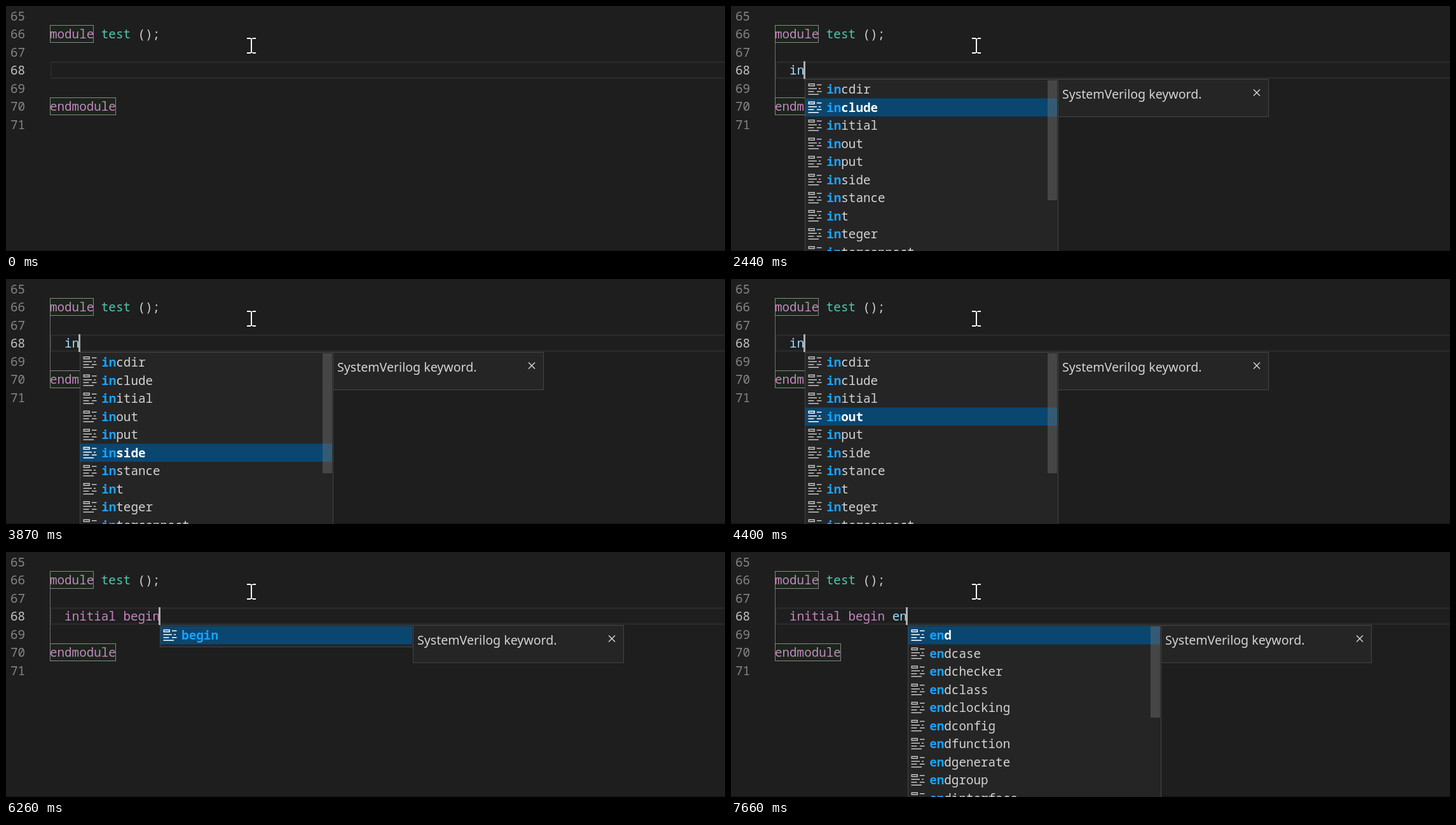
An HTML page with a canvas for the animation above (8 s loop, 1131 by 386 pixels).

```html
<!DOCTYPE html>
<html lang="en">
<head>
<meta charset="utf-8">
<title>Editor completion</title>
<style>
  html, body { margin: 0; width: 100%; height: 100%; overflow: hidden; background: #1e1e1e; }
  canvas { display: block; }
</style>
</head>
<body>
<canvas id="stage" width="1131" height="386"></canvas>
<script>
const ctx = document.getElementById('stage').getContext('2d');
const LOOP = 8000, ROW = 28.5, CHAR = 11.545;
const MONO = '19.24px "Noto Sans Mono", monospace';
const SANS = '19.6px "Noto Sans", sans-serif';
const PURPLE = '#c586c0', BLUE = '#9cdcfe', LIGHT = '#d4d4d4';

// Each track lists [start, value...]; the latest entry that has started applies.
const typed = [
  [0, ''], [1310, 'i'], [1510, 'in'], [5060, 'initial'], [5590, 'initial '],
  [5790, 'initial b'], [5860, 'initial be'], [6130, 'initial begi'],
  [6260, 'initial begin'], [7120, 'initial begin '],
  [7450, 'initial begin e'], [7660, 'initial begin en']
];
const blinks = [520, 980, 1310, 1980, 2440, 2920, 3450, 3920, 4400, 4930, 5060, 5520, 5590, 6790, 7120];
const selected = [
  [0, 0], [2440, 1], [2770, 2], [2990, 3], [3120, 4], [3320, 5], [3450, 6],
  [3870, 5], [4050, 4], [4270, 3], [4660, 2], [5060, 0]
];
const endings = 'end endcase endchecker endclass endclocking endconfig endfunction endgenerate endgroup endinterface';
// start, left edge, matched letters, items, scroll thumb height
const popups = [
  [0],
  [1590, 116, 'in', 'incdir include initial inout input inside instance int integer interconnect', 189],
  [5060],
  [5930, 207, 'be', 'before begin break byte disable table', 0],
  [6130, 230, 'begi', 'begin', 0],
  [6260, 242, 'begin', 'begin', 0],
  [7120],
  [7520, 266, 'e', 'edge else ' + endings, 110],
  [7660, 278, 'en', endings, 144]
];
const icon = [[10, 3, 5, 1], [1, 7, 9, 1], [12, 7, 2, 1], [1, 10, 6, 1], [10, 10, 5, 1], [1, 13, 11, 1],
  [1, 2, 7, 1], [1, 4, 7, 1], [1, 3, 1, 1], [7, 3, 1, 1]];

const at = (track, t) => track.findLast(entry => entry[0] <= t);

function rect(x, y, w, h, color) {
  ctx.fillStyle = color;
  ctx.fillRect(x, y, w, h);
}

function frame(x, y, w, h, color, fill) {
  rect(x, y, w, h, color);
  rect(x + 1, y + 1, w - 2, h - 2, fill);
}

function text(s, x, y, color, font = MONO) {
  ctx.font = font;
  ctx.fillStyle = color;
  ctx.fillText(s, x, y);
}

function drawEditor(code, cursorOn) {
  rect(0, 0, 1131, 386, '#1e1e1e');
  rect(0, 384, 1131, 2, '#191919');
  for (let n = 0; n < 7; n++) {
    text(65 + n, 7, 22.5 + n * ROW, n === 3 ? '#c6c6c6' : '#858585');
  }
  rect(70, 87, 1061, 28, '#282828');
  rect(72, 90, 1059, 22, '#1e1e1e');
  if (code) rect(69, 58, 1, 86, '#707070');

  frame(69, 30, 69, 28, '#888888', '#1b251b');
  frame(69, 144, 104, 28, '#888888', '#1b251b');
  text('module', 69, 51, PURPLE);
  text('test', 149.8, 51, '#4ec9b0');
  text('();', 207.5, 51, LIGHT);
  text('endmodule', 69, 165, PURPLE);

  let x = 92.1;
  for (const word of code.split(' ')) {
    text(word, x, 108, /^(initial|begin)$/.test(word) ? PURPLE : BLUE);
    x += (word.length + 1) * CHAR;
  }
  if (cursorOn) rect(Math.floor(90.95 + code.length * 11.53), 87, 3, 28, '#aeafad');
}

function drawItem(item, match, left, top, active) {
  const color = active ? '#ffffff' : LIGHT;
  if (active) rect(left + 1, top, 396, ROW, '#094771');
  for (const [x, y, w, h] of icon) {
    rect(left + 4 + x * 1.5, top + 2 + y * 1.5, w * 1.5, h * 1.5, active ? '#ffffff' : '#c5c5c5');
  }
  let hits = 0;
  [...item].forEach((letter, i) => {
    const hit = letter === match[hits];
    if (hit) hits++;
    text(letter, left + 34.2 + i * CHAR, top + 21, hit ? '#18a3ff' : color,
      (hit || active ? 'bold ' : '') + MONO);
  });
}

function drawPopup([, left, match, list, thumb], active) {
  const items = list.split(' ');
  const height = thumb ? 348 : Math.round(items.length * ROW + 6);
  frame(left, 115, 399, height, '#454545', '#252526');
  items.forEach((item, i) => drawItem(item, match, left, 117 + i * ROW, i === active));
  if (thumb) rect(left + 382, 117, 15, thumb, 'rgba(121,121,121,.4)');

  frame(left + 398, 115, 332, 60, '#454545', '#252526');
  text('SystemVerilog keyword.', left + 405, 146, LIGHT, SANS);
  ctx.strokeStyle = LIGHT;
  ctx.lineWidth = 1.5;
  ctx.beginPath();
  for (const d of [-5, 5]) {
    ctx.moveTo(left + 711 - d, 131.5);
    ctx.lineTo(left + 711 + d, 141.5);
  }
  ctx.stroke();
}

function drawPointer() {
  for (const y of [50, 73]) {
    rect(379, y, 6, 2, '#ffffff');
    rect(388, y, 5, 2, '#ffffff');
  }
  rect(385, 51, 2, 23, '#ffffff');
  rect(384, 51, 4, 1, '#ffffff');
  rect(384, 73, 4, 1, '#ffffff');
}

function draw(now) {
  const t = now % LOOP;
  const popup = at(popups, t);
  drawEditor(at(typed, t)[1], blinks.filter(b => b <= t).length % 2 === 1);
  if (popup.length > 1) drawPopup(popup, at(selected, t)[1]);
  drawPointer();
}

const start = performance.now();
function tick() {
  draw(performance.now() - start);
  requestAnimationFrame(tick);
}
tick();
</script>
</body>
</html>
```
